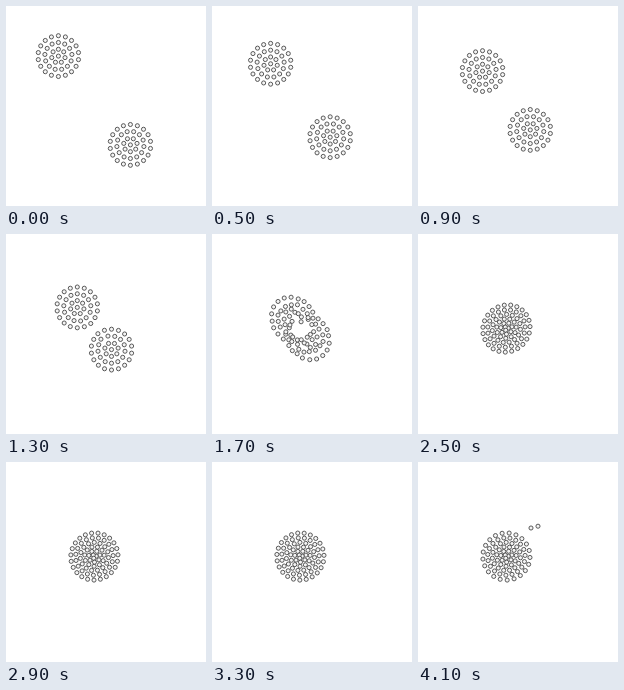
An HTML page for the animation above (4200 ms loop, 200 by 200 pixels).

```html
<!DOCTYPE html>
<html lang="en">
<head>
<meta charset="utf-8">
<title>Merging clusters</title>
<style>
  html, body { margin: 0; width: 100%; height: 100%; overflow: hidden; background: #fff; }
  svg { display: block; width: 100vw; height: 100vh; }
  circle { fill: #f4f4f4; stroke: #484848; stroke-width: .9; }
</style>
</head>
<body>
<svg id="stage" viewBox="0 0 200 200"></svg>
<script>
const LOOP = 4200, STEP = 100;
const MID = { x: 88.4, y: 94.5 };
const REACH = { x: 36, y: 44.4 };   // from each cluster's start to MID
const TOUCH = 1700, LEAVE = 3600, FLIGHT = 500;

// Curve control point and end of each escaping particle.
const ESCAPES = [
  { via: { x: 108, y: 67 }, end: { x: 113, y: 66 } },
  { via: { x: 114, y: 50 }, end: { x: 120, y: 64.2 } }
];

const clamp = x => Math.max(0, Math.min(1, x));
const mix = (a, b, k) => a + (b - a) * k;
const smooth = x => x * x * (3 - 2 * x);
const blend = (a, b, k) => ({ x: mix(a.x, b.x, k), y: mix(a.y, b.y, k) });
const gap = (a, b) => Math.hypot(a.x - b.x, a.y - b.y);
const polar = (r, deg) => {
  const a = deg * Math.PI / 180;
  return { x: r * Math.cos(a), y: r * Math.sin(a) };
};

// Two mirrored clusters, each made of even rings.
const parts = [];
[1, 7, 13, 18].forEach((count, ring) => {
  for (let i = 0; i < count; i++) {
    const p = polar(6.8 * ring, -90 + i * 360 / count);
    parts.push({ x: p.x, y: p.y, side: 1 }, { x: -p.x, y: -p.y, side: -1 });
  }
});

function approach(p, t) {
  const s = t / 1000;
  const left = p.side * Math.max(0, 1 - .31 * s - .072 * s * s);
  return { x: MID.x + p.x - REACH.x * left, y: MID.y + p.y - REACH.y * left };
}

// Rings of the merged body, outermost first; each slot takes the nearest free particle.
function assignSlots() {
  const free = new Set(parts);
  for (let ring = 0; ring < 6; ring++) {
    const count = 23 - 4 * ring, r = 23.6 - 5 * ring + .13 * ring * ring;
    for (let i = 0; i < count; i++) {
      const angle = -65.4 - 13 * ring + i * 360 / count, slot = polar(r, angle);
      const target = { x: MID.x + slot.x, y: MID.y + slot.y };
      const reach = p => gap(approach(p, TOUCH), target);
      const p = [...free].reduce((a, b) => reach(b) < reach(a) ? b : a);
      free.delete(p);
      const delay = 1150 + 14 * gap(approach(p, TOUCH), MID);
      Object.assign(p, { ring, i, r, angle, delay });
    }
  }
}

function settled(p, t) {
  let angle = p.angle + .7 * Math.sin(t / 260 + p.ring * 2);
  if (p.ring === 0 && p.i > 1) {
    // The outer ring closes up behind the escaping pair.
    const open = smooth(clamp((t - LEAVE) / 400));
    angle += open * (p.i - 12) * (360 / 21 - 360 / 23);
  }
  const q = polar(p.r, angle);
  // Fading bulge across the line of impact.
  const bulge = .04 * Math.exp(-Math.max(0, t - 2400) / 350);
  return { x: MID.x + q.x - bulge * q.y, y: MID.y + q.y - bulge * q.x };
}

function place(p, t) {
  const k = smooth(clamp((t - p.delay) / 750));
  const pos = blend(approach(p, t), settled(p, t), k);
  if (p.ring > 0 || p.i > 1 || t < LEAVE) return pos;
  const { via, end } = ESCAPES[p.i], u = clamp((t - LEAVE) / FLIGHT);
  return blend(blend(pos, via, u), blend(via, end, u), u);
}

assignSlots();
const stage = document.getElementById('stage');
for (const p of parts) {
  p.dot = document.createElementNS(stage.namespaceURI, 'circle');
  p.dot.setAttribute('r', 2.05);
  stage.append(p.dot);
}

function draw(t) {
  for (const p of parts) {
    const { x, y } = place(p, t);
    p.dot.setAttribute('cx', x.toFixed(2));
    p.dot.setAttribute('cy', y.toFixed(2));
  }
}

const began = performance.now();
function tick() {
  const t = (performance.now() - began) % LOOP;
  draw(Math.floor(t / STEP) * STEP);
  requestAnimationFrame(tick);
}
tick();
</script>
</body>
</html>
```
